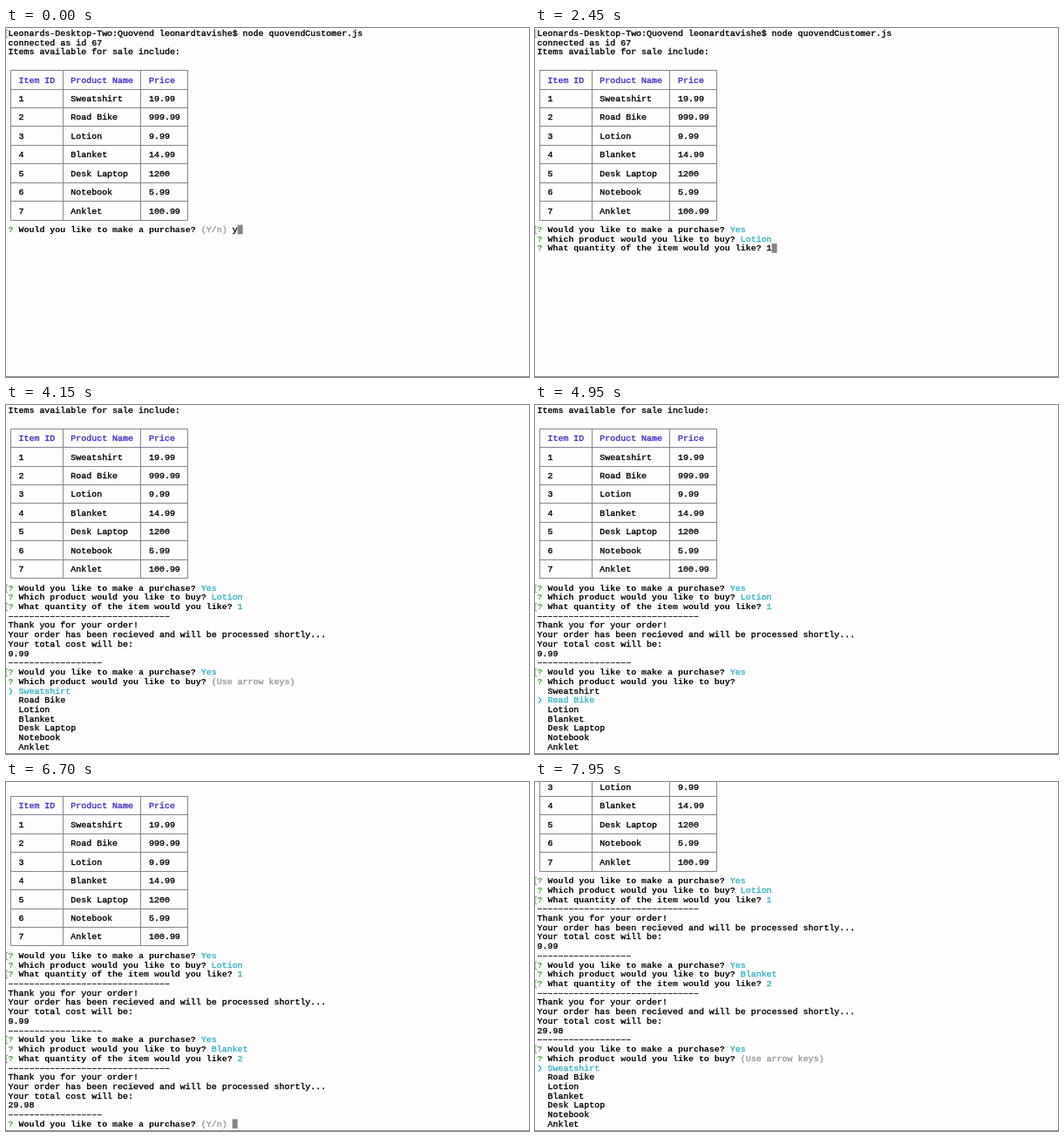
An HTML page with a canvas for the animation above (8 s loop, 600 by 400 pixels).

```html
<!DOCTYPE html>
<html lang="en">
<head>
<meta charset="utf-8">
<title>Terminal shop</title>
<style>
  html, body { margin: 0; width: 100%; height: 100%; overflow: hidden; background: #fdfdfd; }
  canvas { display: block; width: 600px; height: 400px; }
</style>
</head>
<body>
<canvas id="screen"></canvas>
<script>
const LOOP = 8000, ROWS = 37, CELL = 5.98, LINE = 10.72, LEFT = 2.5, BASELINE = 8.9;
const INK = '#000', GREEN = '#4aa83a', TEAL = '#38b0c4', HEAD = '#3d2ec4',
      HINT = '#96969c', GRID = '#85858f', CURSOR = '#85858a', PAPER = '#fdfdfd';
const FONT = '9.97px "Liberation Mono", "DejaVu Sans Mono", monospace';

const products = [
  ['Sweatshirt', '19.99'], ['Road Bike', '999.99'], ['Lotion', '9.99'], ['Blanket', '14.99'],
  ['Desk Laptop', '1200'], ['Notebook', '5.99'], ['Anklet', '100.99']
];
const TABLE_ROW = 4, TABLE_COLS = [0, 10, 25, 34];

// A line is a list of parts; a part is text with a colour and weight.
const part = (text, color = INK, bold = false) => ({ text, color, bold });
const plain = text => [part(text)];
const marked = line => Object.assign(line, { mark: true });
const withCursor = line => Object.assign(line, { cursor: true });
const question = text => [part('? ', GREEN, true), part(text + ' ', INK, true)];
const rule = length => plain('–'.repeat(length));

const AGAIN = 'Would you like to make a purchase?';
const WHICH = 'Which product would you like to buy?';
const AMOUNT = 'What quantity of the item would you like?';

const answer = (text, reply) => [...question(text), part(reply, TEAL)];
const yes = () => marked(answer(AGAIN, 'Yes'));
const confirm = typed =>
  withCursor([...question(AGAIN), part('(Y/n) ', HINT), part(typed)]);
const amount = typed => withCursor([...question(AMOUNT), part(typed)]);

const picker = selected => [
  [...question(WHICH), part(selected ? '' : '(Use arrow keys)', HINT)],
  ...products.map(([name], i) => i === selected
    ? [part('❯ ', TEAL, true), part(name, TEAL)]
    : plain('  ' + name))
];

const receipt = (item, count, total) => [
  yes(),
  answer(WHICH, item),
  marked(answer(AMOUNT, count)),
  rule(31),
  plain('Thank you for your order!'),
  plain('Your order has been recieved and will be processed shortly...'),
  plain('Your total cost will be:'),
  plain(total),
  rule(18)
];

const tableText = (id, name, price, color) =>
  [part('  ' + id.padEnd(10) + name.padEnd(15) + price, color)];

const intro = [
  marked(plain('Leonards-Desktop-Two:Quovend leonardtavishe$ node quovendCustomer.js')),
  plain('connected as id 67'),
  plain('Items available for sale include:'),
  [], [],
  tableText('Item ID', 'Product Name', 'Price', HEAD), [],
  ...products.flatMap(([name, price], i) => [tableText(String(i + 1), name, price), []])
];
const first = [...intro, ...receipt('Lotion', '1', '9.99')];
const second = [...first, ...receipt('Blanket', '2', '29.98')];
const picking = (history, selected) => [...history, yes(), ...picker(selected)];
const counting = (history, item, typed) =>
  [...history, yes(), answer(WHICH, item), amount(typed)];

const timeline = [
  [0, [...intro, confirm('y')]],
  [250, picking(intro, 0)],
  [650, picking(intro, 1)],
  [850, picking(intro, 2)],
  [1350, counting(intro, 'Lotion', '')],
  [2050, counting(intro, 'Lotion', '1')],
  [2550, [...first, confirm('')]],
  [3500, [...first, confirm('y')]],
  [3700, picking(first, 0)],
  [4700, picking(first, 1)],
  [5000, picking(first, 2)],
  [5250, picking(first, 3)],
  [6050, counting(first, 'Blanket', '')],
  [6350, counting(first, 'Blanket', '2')],
  [6650, [...second, confirm('')]],
  [7400, [...second, confirm('y')]],
  [7650, picking(second, 0)]
];

// The terminal scrolls down when full and never scrolls back.
let scrolled = 0;
const states = timeline.map(([time, lines]) => {
  scrolled = Math.max(scrolled, lines.length - ROWS);
  return { time, lines, top: scrolled };
});

const canvas = document.getElementById('screen');
const ctx = canvas.getContext('2d');
const ratio = window.devicePixelRatio || 1;
canvas.width = 600 * ratio;
canvas.height = 400 * ratio;
ctx.scale(ratio, ratio);

function drawTable(top) {
  const rowY = i => Math.round((TABLE_ROW - top + 2 * i) * LINE + 5.2) + 0.5;
  const colX = col => Math.round(LEFT + (col + 0.5) * CELL - 0.5) + 0.5;
  const last = products.length + 1;
  const xs = TABLE_COLS.map(colX);
  ctx.strokeStyle = GRID;
  ctx.lineWidth = 1;
  ctx.beginPath();
  for (let i = 0; i <= last; i++) {
    ctx.moveTo(xs[0], rowY(i));
    ctx.lineTo(xs[3], rowY(i));
  }
  for (const x of xs) {
    ctx.moveTo(x, rowY(0));
    ctx.lineTo(x, rowY(last));
  }
  ctx.stroke();
}

// A hairline outline gives regular text its medium weight.
function drawText(text, x, y, color, bold) {
  ctx.font = (bold ? 'bold ' : '') + FONT;
  ctx.fillStyle = ctx.strokeStyle = color;
  ctx.lineWidth = 0.35;
  [...text].forEach((char, i) => {
    ctx.fillText(char, x + i * CELL, y);
    if (!bold) ctx.strokeText(char, x + i * CELL, y);
  });
}

function drawLine(line, row) {
  const y = row * LINE + BASELINE;
  let x = LEFT;
  if (line.mark) drawText('[', -2.6, y, HINT);
  for (const { text, color, bold } of line) {
    drawText(text, x, y, color, bold);
    x += text.length * CELL;
  }
  if (line.cursor) {
    ctx.fillStyle = CURSOR;
    ctx.fillRect(x, row * LINE + 0.5, CELL, LINE);
  }
}

function draw({ lines, top }) {
  ctx.fillStyle = PAPER;
  ctx.fillRect(0, 0, 600, 400);
  drawTable(top);
  lines.slice(top).forEach(drawLine);
  ctx.fillStyle = '#8c8c90';
  ctx.fillRect(0, 399, 600, 1);
}

let shown;
const start = performance.now();
function tick() {
  const time = (performance.now() - start) % LOOP;
  const state = states.filter(s => s.time <= time).pop();
  if (state !== shown) draw(shown = state);
  requestAnimationFrame(tick);
}
tick();
</script>
</body>
</html>
```
